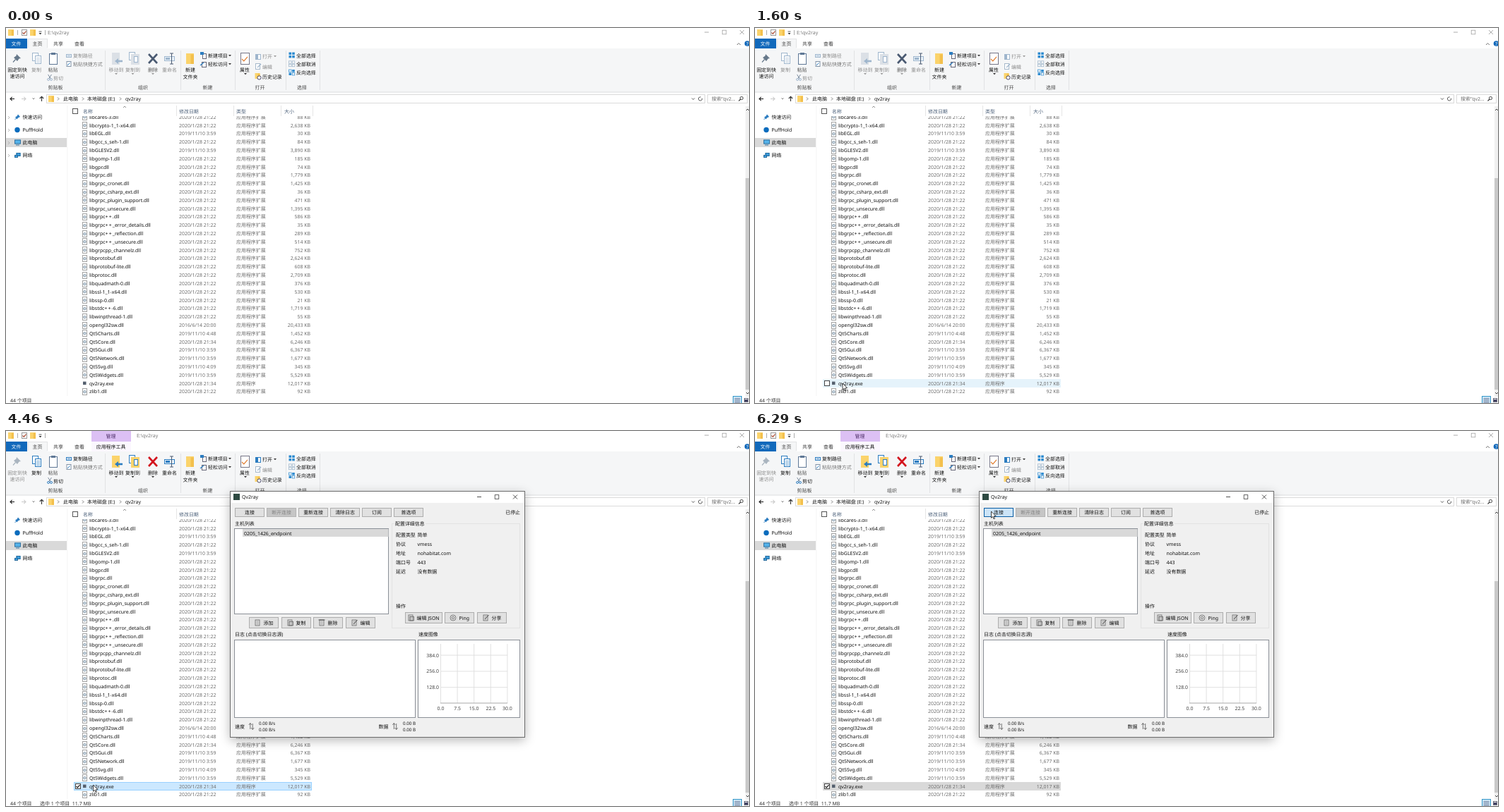
Recreate the animation shown at these times as an HTML page with a canvas. Size 1052 by 532 pixels, loop 8 s.

```html
<!DOCTYPE html>
<html lang="zh-CN">
<head>
<meta charset="utf-8">
<style>
  html, body { margin: 0; width: 100%; height: 100%; overflow: hidden; background: #fff; }
  canvas { display: block; }
</style>
</head>
<body>
<canvas id="stage" width="1052" height="532"></canvas>
<script>
const ctx = document.getElementById('stage').getContext('2d');
const LOOP = 8000;
const FONT = '"Noto Sans", "Noto Sans CJK SC", sans-serif';
const BLACK = '#111', GREY = '#6d6d6d', DIM = '#8c8c8c', BLUE = '#2b7cc0';
const YELLOW = '#fbd36b', SLATE = '#4a5a72', FIELD = '#8b9097';

const DATES = {
  A: '2020/1/28 21:22', B: '2019/11/10 3:59', C: '2020/1/28 21:34',
  D: '2016/6/14 20:00', E: '2019/11/10 4:48', F: '2019/11/10 4:09'
};
const FILES = `libcares-3.dll A 88
libcrypto-1_1-x64.dll A 2638
libEGL.dll B 30
libgcc_s_seh-1.dll A 84
libGLESV2.dll B 3890
libgomp-1.dll A 185
libgpr.dll A 74
libgrpc.dll A 1779
libgrpc_cronet.dll A 1425
libgrpc_csharp_ext.dll A 36
libgrpc_plugin_support.dll A 471
libgrpc_unsecure.dll A 1395
libgrpc++.dll A 586
libgrpc++_error_details.dll A 35
libgrpc++_reflection.dll A 289
libgrpc++_unsecure.dll A 514
libgrpcpp_channelz.dll A 752
libprotobuf.dll A 2624
libprotobuf-lite.dll A 608
libprotoc.dll A 2709
libquadmath-0.dll A 376
libssl-1_1-x64.dll A 530
libssp-0.dll A 21
libstdc++-6.dll A 1719
libwinpthread-1.dll A 55
opengl32sw.dll D 20433
Qt5Charts.dll E 1452
Qt5Core.dll C 6246
Qt5Gui.dll B 6367
Qt5Network.dll B 1677
Qt5Svg.dll F 345
Qt5Widgets.dll B 5529
qv2ray.exe C 12017
zlib1.dll A 92`.split('\n').map(line => line.split(' '));
const EXE = 32;

// time, cursor x, cursor y, hovered row
const POINTER = [
  [610, 432, 463, 29], [820, 414, 458, 28], [1000, 340, 466, 29], [1200, 250, 444, 27],
  [1410, 175, 476, 30], [1600, 124, 504, 32], [4460, 123.5, 502, 32], [4640, 150, 477, 30],
  [4850, 245, 288, 14], [5050, 351, 193, -1], [5240, 350, 145.5, -1], [5450, 346, 123, -1],
  [5660, 339, 115, -1], [5880, 336, 115, -1], [6060, 334.5, 114, -1]
];

function text(str, x, y, color = BLACK, align = 'left', size = 6.95) {
  ctx.font = `${size}px ${FONT}`;
  ctx.textRendering = 'geometricPrecision';
  ctx.fillStyle = color;
  ctx.textAlign = align;
  ctx.fillText(str, x, y + 2.5);
}
const label = (str, x, y, color) => text(str, x, y, color, 'center');

function rect(x, y, w, h, fill, stroke) {
  if (fill) { ctx.fillStyle = fill; ctx.fillRect(x, y, w, h); }
  if (stroke) {
    ctx.strokeStyle = stroke;
    ctx.lineWidth = 1;
    ctx.strokeRect(x + .5, y + .5, w - 1, h - 1);
  }
}
function path(points, stroke, width = 1, fill) {
  ctx.beginPath();
  for (let i = 0; i < points.length; i += 2) ctx.lineTo(points[i], points[i + 1]);
  if (fill) { ctx.closePath(); ctx.fillStyle = fill; ctx.fill(); }
  if (stroke) { ctx.strokeStyle = stroke; ctx.lineWidth = width; ctx.stroke(); }
}
function circle(x, y, r, fill, stroke, width = 1) {
  ctx.beginPath();
  ctx.arc(x, y, r, 0, 7);
  if (fill) { ctx.fillStyle = fill; ctx.fill(); }
  if (stroke) { ctx.strokeStyle = stroke; ctx.lineWidth = width; ctx.stroke(); }
}
const triangle = (x, y, color = '#333') => path([x - 2, y - 1, x + 2, y - 1, x, y + 1.3], null, 1, color);
const chevron = (x, y, color = '#555') => path([x - 1, y - 2, x + 1, y, x - 1, y + 2], color, .8);
const check = (x, y, s, color) => path([x - s, y, x - s * .3, y + s * .7, x + s, y - s * .8], color, 1.2);
const folder = (x, y, w, h) => {
  rect(x, y, w, h, YELLOW);
  rect(x + w * .6, y + h * .1, w * .4, h * .9, '#f3c04d');
};
const page = (x, y, w, h, stroke = '#8fa9c4') => rect(x, y, w, h, '#fff', stroke);
const arrow = (x, y, dir, color) => {
  path([x - 3, y, x + 3, y], color, 1.1);
  path([x + dir * .3, y - 2.7, x + dir * 3, y, x + dir * .3, y + 2.7], color, 1.1);
};
function captionButtons(xs, y, color) {
  const [a, b, c] = xs;
  path([a - 3, y, a + 3, y], color, .8);
  ctx.lineWidth = .7;
  ctx.strokeRect(b - 2.8, y - 2.8, 5.6, 5.6);
  path([c - 3, y - 3, c + 3, y + 3], color, .8);
  path([c - 3, y + 3, c + 3, y - 3], color, .8);
}

function titleBar(selected, active) {
  folder(3, 2, 8, 9);
  path([16.5, 3, 16.5, 10], '#999', .8);
  page(22, 2, 8, 9, '#999');
  check(26, 6.5, 2.5, '#b0563f');
  folder(34, 2, 8, 9);
  path([46.5, 5, 50.5, 5], '#333', .8);
  triangle(48.5, 8);
  path([55.5, 3, 55.5, 10], '#999', .8);
  if (selected) {
    rect(121, 0, 56, 15, '#dcc0f4');
    rect(121, 15, 56, 14, '#fbf7fe');
    label('管理', 148.5, 7.5, '#4b2b66');
    label('应用程序工具', 148.5, 22);
  }
  text('E:\\qv2ray', selected ? 185 : 59, 6.5, active ? BLACK : '#777');
  captionButtons([992, 1017, 1042], 6, active ? '#222' : '#999');

  rect(0, 15, 30, 14, '#1169bb');
  label('文件', 14.5, 22, '#fff');
  rect(31, 15, 28, 15, '#f5f6f7', '#e3e4e6');
  label('主页', 44.5, 22, '#333');
  label('共享', 74, 22, '#333');
  label('查看', 104, 22, '#333');
  path([1035, 24, 1037.5, 21.5, 1040, 24], '#666', .9);
  circle(1049.5, 22, 3.8, '#1169bb');
  label('?', 1049.5, 22, '#fff');
}

function ribbon(on) {
  const c = on ? BLACK : DIM, blue = on ? BLUE : '#9fb6cd', gold = on ? YELLOW : '#dbe0e6';
  rect(0, 29, 1052, 62, '#f5f6f7');
  rect(31, 28, 28, 2, '#f5f6f7');
  rect(0, 90.5, 1052, 1, '#dcdddf');
  for (const x of [140, 247, 324, 396, 444]) rect(x, 32, 1, 56, '#e1e2e4');
  [['剪贴板', 70], ['组织', 194], ['新建', 285.5], ['打开', 359.5], ['选择', 419]]
    .forEach(([s, x]) => label(s, x, 84, '#444'));

  const pin = on ? '#a9b4bf' : '#66788a';
  path([15, 37, 21, 43, 18.5, 43.5, 16, 47, 11, 42, 14.5, 39.5], null, 1, pin);
  path([13.5, 44.5, 10, 48.5], pin, 1.2);
  label('固定到快', 16, 59, on ? DIM : BLACK);
  label('速访问', 16, 68, on ? DIM : BLACK);

  page(37, 35, 9, 12, blue);
  page(41, 39, 9, 12, blue);
  for (let y = 42; y < 50; y += 2) path([43, y + .5, 48, y + .5], blue, .6);
  label('复制', 43, 59, c);
  rect(61, 36, 12, 16, '#fff', '#5f7896');
  rect(64, 35, 6, 3, '#5f7896');
  label('粘贴', 66.5, 59, '#555');
  rect(85, 37, 8, 5, '#e6eef6', blue);
  path([87, 39.5, 91, 39.5], blue, .8);
  text('复制路径', 95, 39, c);
  page(85.5, 47, 7, 8, '#8092a6');
  path([87, 53, 90.5, 49.5], BLUE, 1);
  text('粘贴快捷方式', 95, 51, '#777');
  path([59.5, 66, 63.5, 72], '#6f8296', .9);
  path([64.5, 66, 60.5, 72], '#6f8296', .9);
  circle(60, 73, 1.5, null, blue, .9);
  circle(64, 73, 1.5, null, blue, .9);
  text('剪切', 67, 71, c);

  rect(150, 35, 11, 17, gold);
  path([165, 47, 158, 47], blue, 2.6);
  path([159, 43, 154, 47, 159, 51], null, 1, blue);
  label('移动到', 156, 59, c);
  page(174, 34, 9, 12, blue);
  rect(177, 37, 12, 15, gold);
  page(181, 40, 6, 9, blue);
  label('复制到', 179.5, 59, c);
  const cross = on ? '#d3141d' : SLATE;
  path([202, 37, 214, 50], cross, 2.6);
  path([214, 37, 202, 50], cross, 2.6);
  label('删除', 208, 59, on ? BLACK : '#555');
  rect(224, 40, 15, 7, '#eaf3fb', blue);
  rect(226, 42, 6, 3, blue);
  path([232, 36, 237, 36], SLATE, 1);
  path([234.5, 36, 234.5, 51], SLATE, 1);
  path([232, 51, 237, 51], SLATE, 1);
  label('重命名', 231.5, 59, c);
  [156, 179.5, 208].forEach(x => triangle(x, 65, on ? '#333' : '#999'));

  folder(255, 36, 11, 15);
  label('新建', 261, 59);
  label('文件夹', 261, 69);
  page(278, 36, 6, 8, '#667');
  rect(275, 34, 5, 4, BLUE);
  text('新建项目', 286, 39);
  page(277, 48, 7, 8, '#667');
  path([275, 53, 280, 49], BLUE, 1.3);
  text('轻松访问', 286, 51);
  triangle(317, 39);
  triangle(317, 51);

  page(332, 35, 13, 17, '#778');
  check(338, 44, 4, '#e07a2b');
  label('属性', 338, 59);
  triangle(339, 65);
  rect(353, 37, 8, 8, '#fff', blue);
  rect(354, 38, 3, 6, blue);
  text('打开', 363, 40, c);
  triangle(381, 40, on ? '#333' : '#999');
  page(353, 50, 7, 9, '#a6b8ca');
  path([356, 56, 361, 51], '#9fb6cd', 1.3);
  text('编辑', 363, 55, DIM);
  folder(352.5, 64, 7, 8);
  circle(358.5, 70.5, 2.6, '#fff', '#446');
  text('历史记录', 363, 69);

  ['全部选择', '全部取消', '反向选择'].forEach((s, i) => {
    const y = 34 + i * 12.3;
    for (let k = 0; k < 4; k++) {
      const solid = i === 0 || (i === 2 && (k === 1 || k === 2));
      ctx.lineWidth = .7;
      ctx.strokeStyle = ctx.fillStyle = i === 1 ? '#9db4c9' : '#2b8ad0';
      const box = [400.5 + (k % 2) * 4.7, y + .5 + (k >> 1) * 4.5, 3.6, 3.4];
      solid ? ctx.fillRect(...box) : ctx.strokeRect(...box);
    }
    text(s, 411, 39 + i * 12.2);
  });
}

function addressBar() {
  arrow(9, 100.5, -1, '#222');
  arrow(25, 100.5, 1, '#ccc');
  path([37.5, 99.5, 39, 101, 40.5, 99.5], '#555', .8);
  path([50.5, 104, 50.5, 97.5], '#333', 1.1);
  path([47.8, 100, 50.5, 97.3, 53.2, 100], '#333', 1.1);
  rect(57, 94, 933, 13, '#fff', '#dadada');
  rect(993, 94, 57, 13, '#fff', '#dadada');
  folder(60, 96, 8, 9);
  [74, 109, 162].forEach(x => chevron(x, 100.5));
  text('此电脑', 81, 100);
  text('本地磁盘 (E:)', 115, 100);
  text('qv2ray', 169, 100);
  path([971, 99.5, 973, 101.5, 975, 99.5], '#444', .9);
  ctx.beginPath();
  ctx.arc(983, 100.5, 2.6, -.3, 5);
  ctx.stroke();
  text('搜索"qv2...', 999, 100, GREY);
  circle(1041.5, 99.5, 2.1, null, '#333', .9);
  path([1040, 101, 1037.5, 103.5], '#333', 1.1);
}

function sidebar(chevrons) {
  rect(0, 156, 86, 13, '#d9d9d9');
  path([17, 122.5, 20, 126, 17, 127.5, 15.5, 129.5, 13, 126.5, 15.5, 125], null, 1, BLUE);
  path([14.5, 128, 12.5, 130], BLUE, 1);
  circle(16, 144.5, 3.7, '#0a6cbd');
  rect(12, 158.5, 9, 6, '#55b4ec', '#35729f');
  rect(14, 165.5, 5, 1, '#35729f');
  rect(14.5, 177, 6, 5, '#3c9fe0', '#276a9c');
  rect(12, 180, 5, 4, '#3c9fe0', '#276a9c');
  ['快速访问', 'PuffHold', '此电脑', '网络'].forEach((s, i) => {
    text(s, 23.5, 126.5 + i * 18);
    if (chevrons) chevron(4, 127 + i * 18, '#aaa');
  });
  rect(86.5, 110, .7, 412, '#f0f0f0');
}

function checkbox(y, checked) {
  rect(98, Math.round(y - 4), 8, 8, '#fff', '#444');
  if (checked) check(102, y, 2.5, '#111');
}

function fileList(hover, selected, focused) {
  ctx.save();
  ctx.beginPath();
  ctx.rect(88, 125, 958, 397);
  ctx.clip();
  FILES.forEach(([name, date, size], i) => {
    const y = 126.2 + i * 11.81, top = Math.round(y - 5.9);
    const picked = selected && i === EXE;
    if (picked) rect(96, top, 337, 12, focused ? '#cce8ff' : '#d9d9d9', focused ? '#99d1ff' : null);
    else if (i === hover) rect(96, top, 337, 12, '#e5f3fb');
    if (picked || i === hover) checkbox(y, picked);
    if (i === EXE) rect(109, y - 2.5, 4.5, 4.5, '#55606e');
    else {
      rect(108, top + 1, 7, 10, '#fff', '#a2a2a2');
      circle(111.5, top + 6.2, 1.7, '#dce6ee', '#71889b', .9);
    }
    // plus signs carry wide side bearings
    text(name.replace(/\+/g, '+\u2009'), 118, y);
    text(DATES[date], 245, y, GREY);
    text(i === EXE ? '应用程序' : '应用程序扩展', 326, y, GREY);
    text((+size).toLocaleString('en-US') + ' KB', 431, y, GREY, 'right');
  });
  ctx.restore();

  rect(94, 114, 8, 8, '#fff', '#555');
  path([166, 113, 168, 111, 170, 113], '#777', .8);
  [['名称', 109], ['修改日期', 245], ['类型', 326], ['大小', 394]]
    .forEach(([s, x]) => text(s, x, 118, '#4c607a'));
  for (const x of [241, 322, 389, 434]) rect(x, 110, 1, 15, '#e5e5e5');

  rect(1047, 111, 5, 412, '#f0f0f0');
  rect(1047, 213, 5, 300, '#c9c9c9');
  path([1048, 117, 1050, 115, 1052, 117], '#444', 1);
  path([1048, 517, 1050, 519, 1052, 517], '#444', 1);
  text('44 个项目', 6, 528.5, '#333');
  if (selected) text('选中 1 个项目  11.7 MB', 48, 528.5, '#333');
  rect(1029, 522, 13, 11, '#cce8f8', '#3596c8');
  for (let y = 525; y < 532; y += 2) path([1031.5, y + .5, 1039.5, y + .5], '#557', .7);
  rect(1045, 525, 6, 6, '#fff', '#667');
  rect(1046, 527, 4, 3, '#446');
}

function button(str, x, y, w, h, fill = '#e1e1e1', border = '#adadad', color = BLACK) {
  rect(x, y, w, h, fill, border);
  label(str, x + w / 2, y + h / 2, color);
}
function iconButton(str, x, y, w, kind) {
  rect(x, y, w, 16, '#e1e1e1', '#adadad');
  text(str, x + 20.5 - (w > 50 ? 4 : 0), y + 8);
  const cx = x + (w > 50 ? 8 : 12), cy = y + 8;
  if (kind === 'ping') {
    circle(cx, cy, 4, null, '#555', .7);
    circle(cx, cy, 1.7, null, '#555', .7);
    return;
  }
  ctx.lineWidth = .7;
  ctx.strokeStyle = '#555';
  ctx.strokeRect(cx - 3, cy - 4, 6, 8);
  if (kind === 'trash') path([cx - 4.5, cy - 4, cx + 4.5, cy - 4], '#444', .9);
  if (kind === 'copy') ctx.strokeRect(cx - 1, cy - 1.5, 5.5, 5.5);
  if (kind === 'edit') path([cx - 1, cy + 2, cx + 4.5, cy - 4], '#444', 1);
  for (let k = -2; k < 4; k += 2) path([cx - 1.5, cy + k, cx + 1.5, cy + k], '#777', .6);
}
function transferIcon(x, y) {
  for (const s of [-1, 1]) {
    const ax = x + s * 1.7, tip = y + s * 4.5;
    path([ax, y - s * 4, ax, tip], '#555', .8);
    path([ax - 2, tip - s * 2.4, ax, tip, ax + 2, tip - s * 2.4], '#555', .8);
  }
}

function windowFrame(opening) {
  if (!opening) {
    ctx.shadowColor = 'rgba(0,0,0,.28)';
    ctx.shadowBlur = 14;
    ctx.shadowOffsetY = 4;
  }
  rect(317, 85, 418, 350, opening ? '#fff' : '#f0f0f0');
  ctx.shadowColor = 'transparent';
  rect(317, 85, 418, 350, null, opening ? '#999' : '#6b6b6b');
  rect(318, 86, 416, 16, '#fff');
  rect(322, 89, 9, 9, '#2f4a42');
  text('Qv2ray', 334, 93.5);
  captionButtons([670, 695, 721], 93.5, '#222');
}

function windowBody(connect, listHover) {
  ['连接', '断开连接', '重新连接', '清除日志', '订阅', '首选项'].forEach((s, i) => {
    const style = i === 0 ? connect : i === 1 ? ['#c6c6c6', '#b5b5b5', '#838383'] : [];
    button(s, 324 + i * 45, 109, 42, 13, ...style);
  });
  text('已停止', 728, 115.5, BLACK, 'right');
  text('主机列表', 324, 131);
  rect(323, 138, 219, 122, '#fff', FIELD);
  rect(335, 139, 206.5, 11, listHover ? '#cce8ff' : '#d9d9d9', listHover && '#99d1ff');
  text('0205_1426_endpoint', 337, 145);

  rect(546, 131, 182, 149, null, '#e2e2e2');
  rect(549, 127, 45, 8, '#f0f0f0');
  text('配置详细信息', 551, 131);
  [['配置类型', '简单'], ['协议', 'vmess'], ['地址', 'nohabitat.com'], ['端口号', '443'], ['延迟', '没有数据']]
    .forEach(([key, value], i) => {
      text(key, 552, 147 + i * 13);
      text(value, 582.5, 147 + i * 13);
    });
  text('操作', 552, 248);
  iconButton('编辑 JSON', 565, 257, 53, 'copy');
  iconButton('Ping', 621, 257, 42, 'ping');
  iconButton('分享', 667, 257, 42, 'edit');
  [['添加', 'page'], ['复制', 'copy'], ['删除', 'trash'], ['编辑', 'edit']]
    .forEach(([s, kind], i) => iconButton(s, 344 + Math.round(i * 45.5), 264, 42, kind));

  text('日志 (点击切换日志源)', 324, 288);
  text('速度图像', 584, 288);
  rect(323, 296, 257, 111, '#fff', FIELD);
  rect(583, 296, 145, 111, '#fff', FIELD);
  for (let i = 0; i < 5; i++) {
    const x = 615.5 + i * 23.6;
    path([x, 302, x, 386], '#dedede', .9);
    label((i * 7.5).toFixed(1), x, 393, '#444');
  }
  for (let i = 1; i < 4; i++) {
    const y = 386.5 - i * 22.8;
    path([615, y, 710, y], '#dedede', .9);
    text((i * 128).toFixed(1), 613, y, '#444', 'right');
  }
  path([615, 386, 710, 386], '#a8a8a8', 1);

  text('速度', 324, 419);
  transferIcon(347.5, 419);
  text('数据', 527.5, 419);
  transferIcon(551, 419);
  for (const y of [414.5, 423.5]) {
    text('0.00 B/s', 358, y, BLACK, 'left', 6.2);
    text('0.00 B', 562, y, BLACK, 'left', 6.2);
  }
}

function appWindow(t) {
  const scale = t < 4280 ? .962 : t < 4460 ? .993 : 1;
  ctx.save();
  ctx.translate(525.5, 260);
  ctx.scale(scale, scale);
  ctx.translate(-525.5, -260);
  if (t < 4280) {
    ctx.globalAlpha = .35;
    windowFrame(true);
  } else {
    windowFrame(false);
    const connect = t < 5660 ? [] : t < 5880 ? ['#e3ecf3', '#5594c8']
      : t < 6060 ? ['#e5f1fb', '#0078d7'] : ['#cce4f7', '#0a5ea5'];
    windowBody(connect, t >= 5240 && t < 5450);
  }
  ctx.restore();
}

function pointer(t, x, y) {
  const clicked = (t >= 2260 && t < 2410) || (t >= 6060 && t < 6290);
  if (clicked) circle(x, y, 7, 'rgba(255,255,0,.47)');
  if (t >= 2410 && t < 3650) circle(132.5, 504.5, 3.3, '#eaf6ff', '#2a93d5', 1.6);
  const shape = [0, 0, 0, 9.3, 2.1, 7.4, 3.6, 10.8, 5, 10.2, 3.6, 6.9, 6.6, 6.7];
  path(shape.map((v, i) => v + (i % 2 ? y : x)).concat(x, y), '#111', .8, '#fff');
}

function draw(now) {
  const t = now % LOOP;
  const step = POINTER.filter(p => p[0] <= t).pop();
  const selected = t >= 2020;
  rect(0, 0, 1052, 532, '#fff');
  titleBar(selected, selected && t < 4280);
  ribbon(selected);
  addressBar();
  sidebar(t < 610);
  fileList(step ? step[3] : -1, selected, t < 4640);
  if (t >= 4060) appWindow(t);
  if (step) pointer(t, step[1], step[2]);
  requestAnimationFrame(draw);
}
requestAnimationFrame(draw);
</script>
</body>
</html>
```
